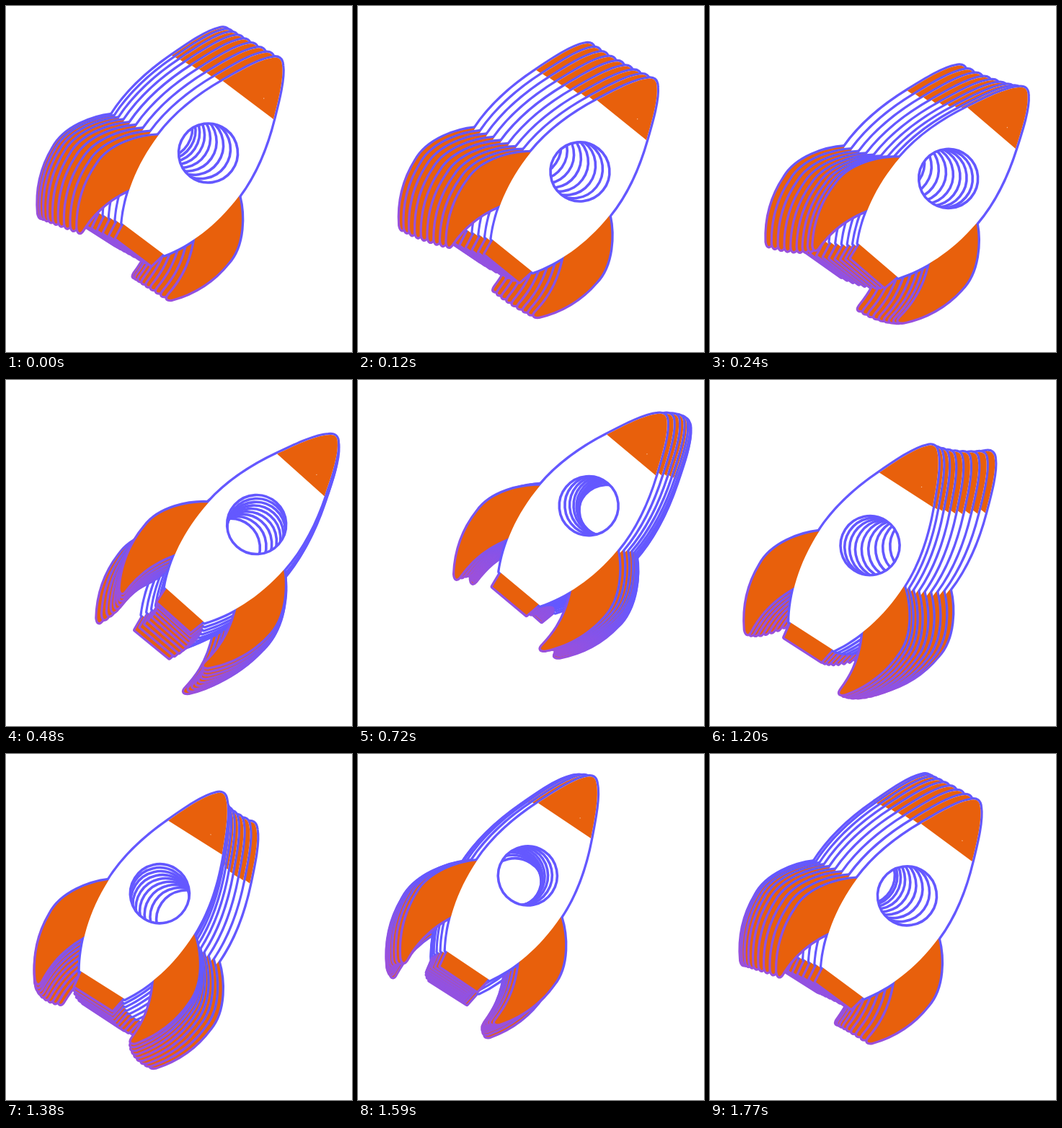
Animation of 480x480 px, one loop 1800 ms. Source, as an HTML page:

```html
<!DOCTYPE html>
<html lang="en">
<head>
<meta charset="utf-8">
<title>Rocket</title>
<style>
  html, body { margin: 0; width: 100%; height: 100%; overflow: hidden; background: #fff; }
  svg { display: block; width: 100vw; height: 100vh; }
</style>
</head>
<body>
<svg viewBox="0 0 480 480" xmlns="http://www.w3.org/2000/svg">
  <defs>
    <linearGradient id="tail" gradientUnits="userSpaceOnUse" x1="0" y1="70" x2="0" y2="190">
      <stop offset="0" stop-color="#6458ff"/>
      <stop offset="1" stop-color="#9a50dc"/>
    </linearGradient>
    <path id="fin" d="M70 22 C90 38 116.500 72 113.500 105 C112.500 140 99 170 82 192 Q75 199 75 191 C76 175 78 145 57 106 Z"/>
    <path id="base" d="M-34.500 147 L34.500 147 L30.500 171.500 L-30.500 171.500 Z"/>
    <path id="hull" d="M-36.500 149.500 C-56 118 -70 75 -70 22 C-70 -18 -58.500 -58 -44 -92
      C-33.500 -117 -21.500 -146 -8.500 -159 Q0 -169 8.500 -159 C21.500 -146 33.500 -117 44 -92
      C58.500 -58 70 -18 70 22 C70 75 56 118 36.500 149.500 Z"/>
    <mask id="window" maskUnits="userSpaceOnUse" x="-130" y="-180" width="260" height="400">
      <rect x="-130" y="-180" width="260" height="400" fill="#fff"/>
      <circle r="41" fill="#000"/>
    </mask>
    <g id="rocket">
      <!-- Outlines sit under all fills, so only the outer contour shows -->
      <g fill="none" stroke="url(#tail)" stroke-width="6.6" stroke-linejoin="round">
        <use href="#fin"/>
        <use href="#fin" transform="scale(-1 1)"/>
        <use href="#base"/>
        <use href="#hull" stroke="#6458ff"/>
      </g>
      <g fill="#e8600c">
        <use href="#fin"/>
        <use href="#fin" transform="scale(-1 1)"/>
        <use href="#base"/>
      </g>
      <use href="#hull" fill="#fff" mask="url(#window)"/>
      <path fill="#e8600c" d="M-44 -92 C-33.500 -117 -21.500 -146 -8.500 -159 Q0 -169 8.500 -159 C21.500 -146 33.500 -117 44 -92 Z"/>
      <circle cx="16" cy="-107" r=".7" fill="#f6c09c"/>
      <circle r="41" fill="none" stroke="#6458ff" stroke-width="3.6"/>
    </g>
  </defs>
  <g id="stack"></g>
</svg>
<script>
  const LOOP = 1800, STEP = 30, COPIES = 9;
  const LAG = 0.15; // radians between neighbouring copies
  const stack = document.getElementById('stack');

  // The first element is the rearmost copy
  const copies = Array.from({ length: COPIES }, () => {
    const use = document.createElementNS('http://www.w3.org/2000/svg', 'use');
    use.setAttribute('href', '#rocket');
    return stack.appendChild(use);
  });

  function pose(angle, lag) {
    const sway = Math.sin(angle - lag);
    const bob = Math.sin(2 * angle - lag);
    const x = 280.5 + 67.5 * sway;
    const y = 204 + 33 * bob + 3.4 * sway;
    const tilt = 37 + 4.8 * sway;
    return `translate(${x.toFixed(2)} ${y.toFixed(2)}) rotate(${tilt.toFixed(2)})`;
  }

  function draw(ms) {
    const t = Math.floor((ms % LOOP) / STEP) * STEP;
    const angle = 2 * Math.PI * t / LOOP;
    copies.forEach((copy, i) =>
      copy.setAttribute('transform', pose(angle, (COPIES - 1 - i) * LAG)));
  }

  const start = performance.now();
  function tick() {
    draw(performance.now() - start);
    requestAnimationFrame(tick);
  }
  tick();
</script>
</body>
</html>
```
